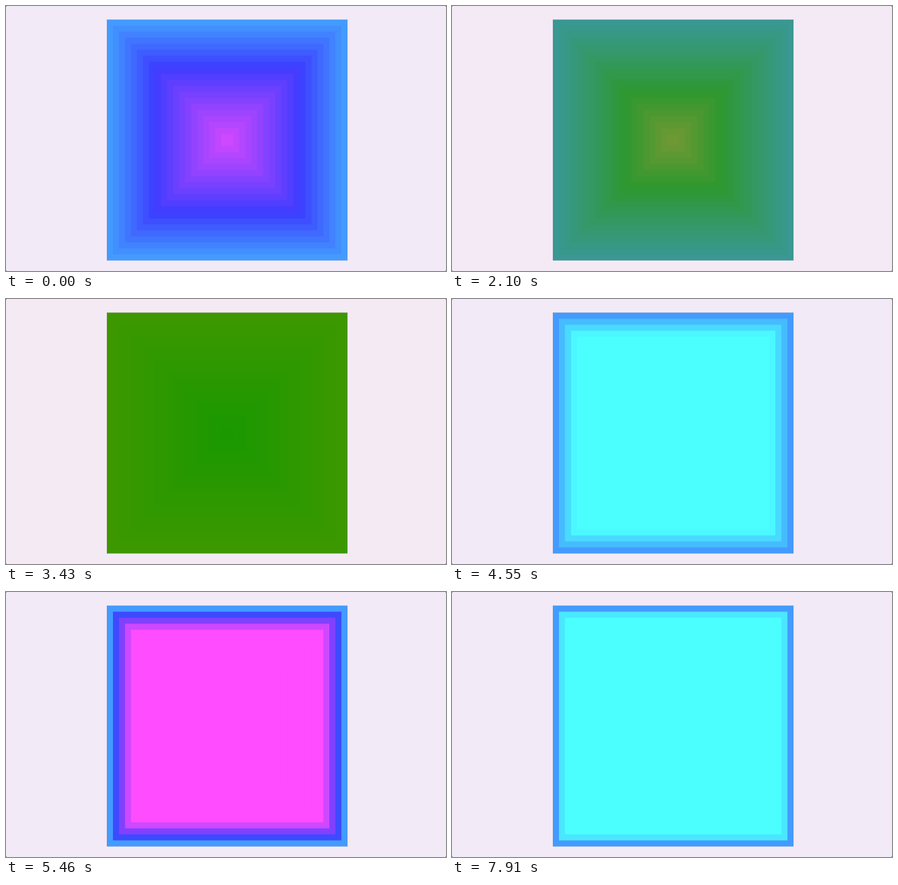
An HTML page with a canvas that plays this animation: 728x438 px, repeating every 8 s.

```html
<!DOCTYPE html>
<html lang="en">
<head>
<meta charset="utf-8">
<title>Nested squares</title>
<style>
  html, body { margin: 0; width: 100%; height: 100%; overflow: hidden; background: #f2eaf7; }
  canvas { display: block; }
</style>
</head>
<body>
<canvas id="stage" width="728" height="438"></canvas>
<script>
const ctx = document.getElementById("stage").getContext("2d");
const LOOP = 8000, TICK = 70;
const RINGS = 20, LEFT = 167, TOP = 22.6, SIZE = 397.9, INSET = SIZE / RINGS / 2;
const GREEN = 152, SWING = 24;

// Times at which the hue shift turns back, alternating high and low
const TURNS = [-940, 1150, 2834, 4004, 5500, 7920, 10000];

const clamp = (v, lo, hi) => Math.min(hi, Math.max(lo, v));

// Hue shift per ring: a cosine swing between neighbouring turns
function shiftAt(t) {
  const i = TURNS.findIndex(turn => turn > t) - 1;
  const p = (t - TURNS[i]) / (TURNS[i + 1] - TURNS[i]);
  return SWING * Math.cos(Math.PI * (i + p));
}

// Blue channel of the outer square: slow fall, quick return
function blueAt(t) {
  const fall = (2520 - t) / 735, rise = (t - 3430) / 140;
  return 255 * clamp(Math.max(fall, rise), 0, 1);
}

function hueColor(hue, lo, hi) {
  const channel = n => {
    const k = (n + hue / 60) % 6;
    return Math.round(hi - (hi - lo) * clamp(Math.min(k, 4 - k), 0, 1));
  };
  return `rgb(${channel(5)},${channel(3)},${channel(1)})`;
}

// Hue turns toward red or away from it, within 60 degrees of the main channel
function ringColor(i, shift, blue) {
  const blueLeads = blue > GREEN;
  const main = blueLeads ? 240 : 120;
  const start = blueLeads
    ? 180 + 32 * (blue - GREEN) / (255 - GREEN)
    : 96 + 84 * blue / GREEN;
  const turn = blueLeads ? shift * i : -shift * i;
  const hue = clamp(start + turn, main - 60, main + 60);
  const lo = Math.sqrt(blue / 255) * (60 + 16 * Math.abs(hue - main) / 60);
  return hueColor(hue, lo, Math.max(blue, GREEN));
}

function draw(t) {
  const shift = shiftAt(t), blue = blueAt(t), warm = 1 - blue / 255;
  ctx.fillStyle = `rgb(${Math.round(242 + 2 * warm)},234,${Math.round(247 - 3 * warm)})`;
  ctx.fillRect(0, 0, 728, 438);

  for (let i = 0; i < RINGS; i++) {
    const side = SIZE - 2 * i * INSET;
    ctx.fillStyle = ringColor(i, shift, blue);
    ctx.fillRect(LEFT + i * INSET, TOP + i * INSET, side, side);
  }

  ctx.strokeStyle = "rgba(60,60,90,0.3)";
  ctx.lineWidth = 0.5;
  ctx.strokeRect(LEFT, TOP, SIZE, SIZE);

  ctx.fillStyle = "rgba(0,0,0,0.6)";
  for (const x of [0, 727]) for (const y of [0, 437]) ctx.fillRect(x, y, 1, 1);
}

function frame() {
  const t = performance.now() % LOOP;
  draw(Math.min(Math.floor(t / TICK), 113) * TICK);
  requestAnimationFrame(frame);
}
frame();
</script>
</body>
</html>
```
